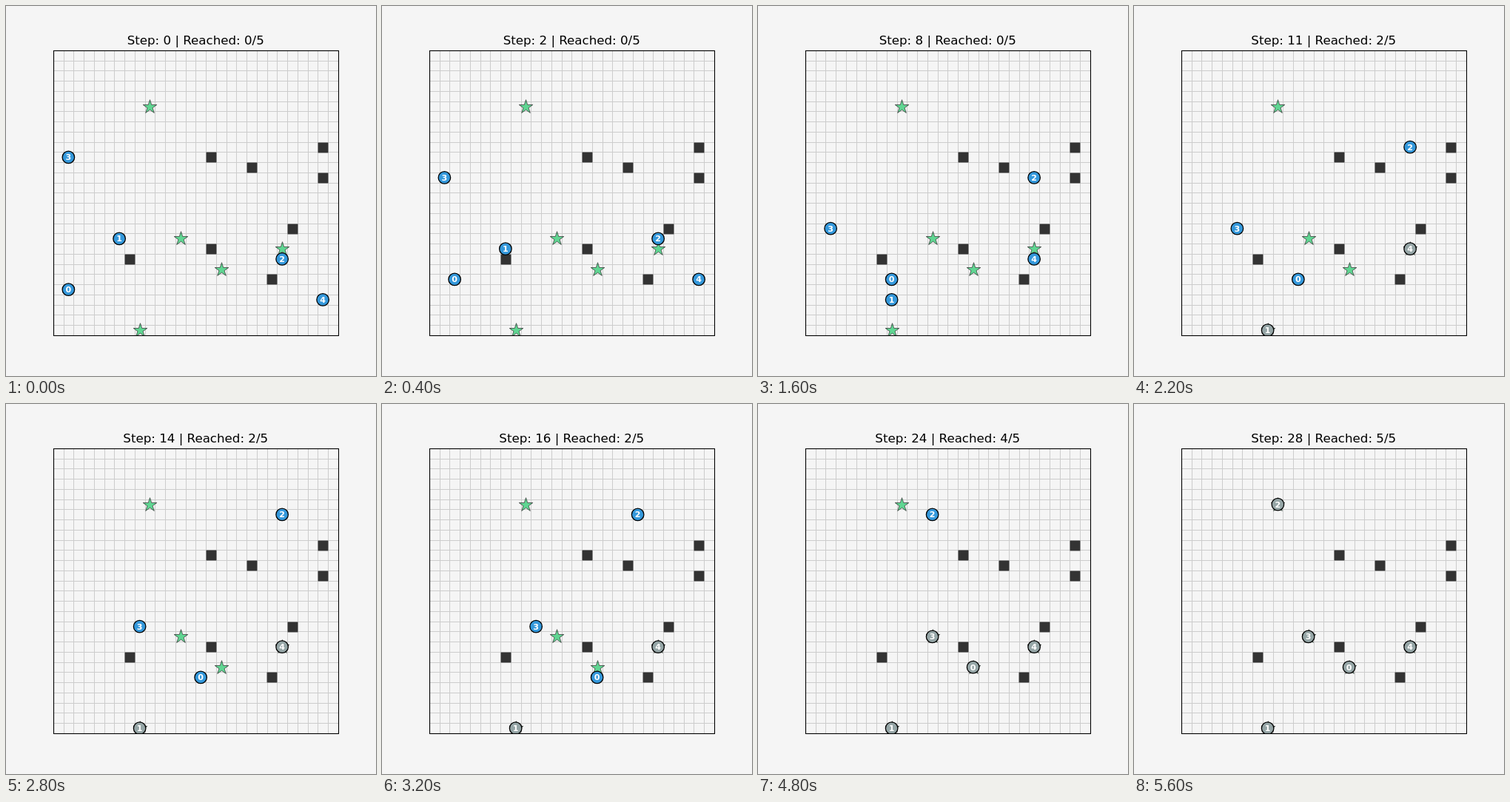
Write an HTML page that moves like this. It is 500 px wide and 500 px high and loops after 5.8 s.

```html
<!DOCTYPE html>
<html lang="en">
<head>
<meta charset="utf-8">
<title>Grid agents</title>
<style>
  html, body { margin: 0; width: 100%; height: 100%; overflow: hidden; background: #f5f5f5; }
  svg { display: block; width: 500px; height: 500px; }
  text { font-family: "DejaVu Sans", sans-serif; text-anchor: middle; }
  .title { font-size: 16.67px; }
  .label { font-size: 11.11px; font-weight: bold; fill: #fff; }
  .grid { stroke: #ccc; stroke-width: 1; fill: none; }
  .star { fill: #2ecc71; stroke: #000; stroke-width: 0.8; opacity: 0.75; }
  .agent { stroke: #000; stroke-width: 1.3; }
</style>
</head>
<body>
<svg id="stage" viewBox="0 0 500 500">
  <clipPath id="plot"><rect x="64" y="60" width="385" height="385"/></clipPath>
</svg>
<script>
const CELLS = 28, CELL = 13.75, LEFT = 63.75, TOP = 60, BOTTOM = 445;
const STEP_MS = 200, STEPS = 29;
const BLUE = '#3498db', GREY = '#95a5a6';

const obstacles = [[15, 17], [19, 16], [26, 18], [26, 15], [23, 10], [15, 8], [7, 7], [21, 5]];

// Start cell (column, row from the bottom) and the moves made, one cell per step.
const agents = [
  { start: [1, 4], moves: 'U1 R15 U1' },
  { start: [6, 9], moves: 'D1 R2 D8' },
  { start: [22, 7], moves: 'U14 L13 U1' },
  { start: [1, 17], moves: 'D7 R11 D1' },
  { start: [26, 3], moves: 'U4 L4 U1' }
];
const DIRS = { U: [0, 1], D: [0, -1], L: [-1, 0], R: [1, 0] };

const stage = document.getElementById('stage');
const px = col => LEFT + (col + 0.5) * CELL;
const py = row => BOTTOM - (row + 0.5) * CELL;
const snap = v => Math.round(v) + 0.5;

function add(parent, tag, attrs) {
  const el = document.createElementNS('http://www.w3.org/2000/svg', tag);
  for (const key in attrs) el.setAttribute(key, attrs[key]);
  return parent.appendChild(el);
}

function walk({ start, moves }) {
  const path = [start];
  for (const leg of moves.split(' ')) {
    const [dx, dy] = DIRS[leg[0]];
    for (let n = +leg.slice(1); n > 0; n--) {
      const [x, y] = path[path.length - 1];
      path.push([x + dx, y + dy]);
    }
  }
  return path;
}

function starPoints(cx, cy, r) {
  return Array.from({ length: 10 }, (_, i) => {
    const a = i * Math.PI / 5, d = i % 2 ? r * 0.382 : r;
    return (cx + d * Math.sin(a)).toFixed(2) + ',' + (cy - d * Math.cos(a)).toFixed(2);
  }).join(' ');
}

const plot = add(stage, 'g', { 'clip-path': 'url(#plot)' });

let lines = '';
for (let i = 1; i < CELLS; i++) {
  const x = snap(LEFT + i * CELL);
  const y = Math.ceil(TOP + i * CELL - 0.5) + 0.5;
  lines += `M${x} ${TOP}V${BOTTOM}M64 ${y}H449`;
}
add(plot, 'path', { class: 'grid', d: lines });

const SIDE = 13.9;
for (const [col, row] of obstacles) {
  add(plot, 'rect', {
    x: snap(px(col)) - SIDE / 2, y: snap(py(row)) - SIDE / 2,
    width: SIDE, height: SIDE, fill: '#333'
  });
}

for (const agent of agents) {
  agent.path = walk(agent);
  agent.last = agent.path.length - 1;
  const [col, row] = agent.path[agent.last];
  add(plot, 'polygon', { class: 'star', points: starPoints(snap(px(col)), snap(py(row)), 9.8) });
}

agents.forEach((agent, i) => {
  agent.group = add(plot, 'g', {});
  agent.disc = add(agent.group, 'circle', { class: 'agent', r: 8.25 });
  add(agent.group, 'text', { class: 'label', y: 4 }).textContent = i;
});

add(stage, 'rect', { x: 64.5, y: 60.5, width: 385, height: 385, fill: 'none', stroke: '#000', 'stroke-width': 1.1 });
const title = add(stage, 'text', { class: 'title', x: 256.25, y: 52 });

function show(step) {
  let reached = 0;
  for (const { path, last, group, disc } of agents) {
    const done = step >= last;
    const [col, row] = path[Math.min(step, last)];
    group.setAttribute('transform', `translate(${px(col)} ${py(row)})`);
    disc.setAttribute('fill', done ? GREY : BLUE);
    if (done) reached++;
  }
  title.textContent = `Step: ${step} | Reached: ${reached}/${agents.length}`;
}

const begin = performance.now();
let shown = 0;
function tick() {
  const step = Math.floor((performance.now() - begin) / STEP_MS) % STEPS;
  if (step !== shown) show(shown = step);
  requestAnimationFrame(tick);
}
show(0);
tick();
</script>
</body>
</html>
```
